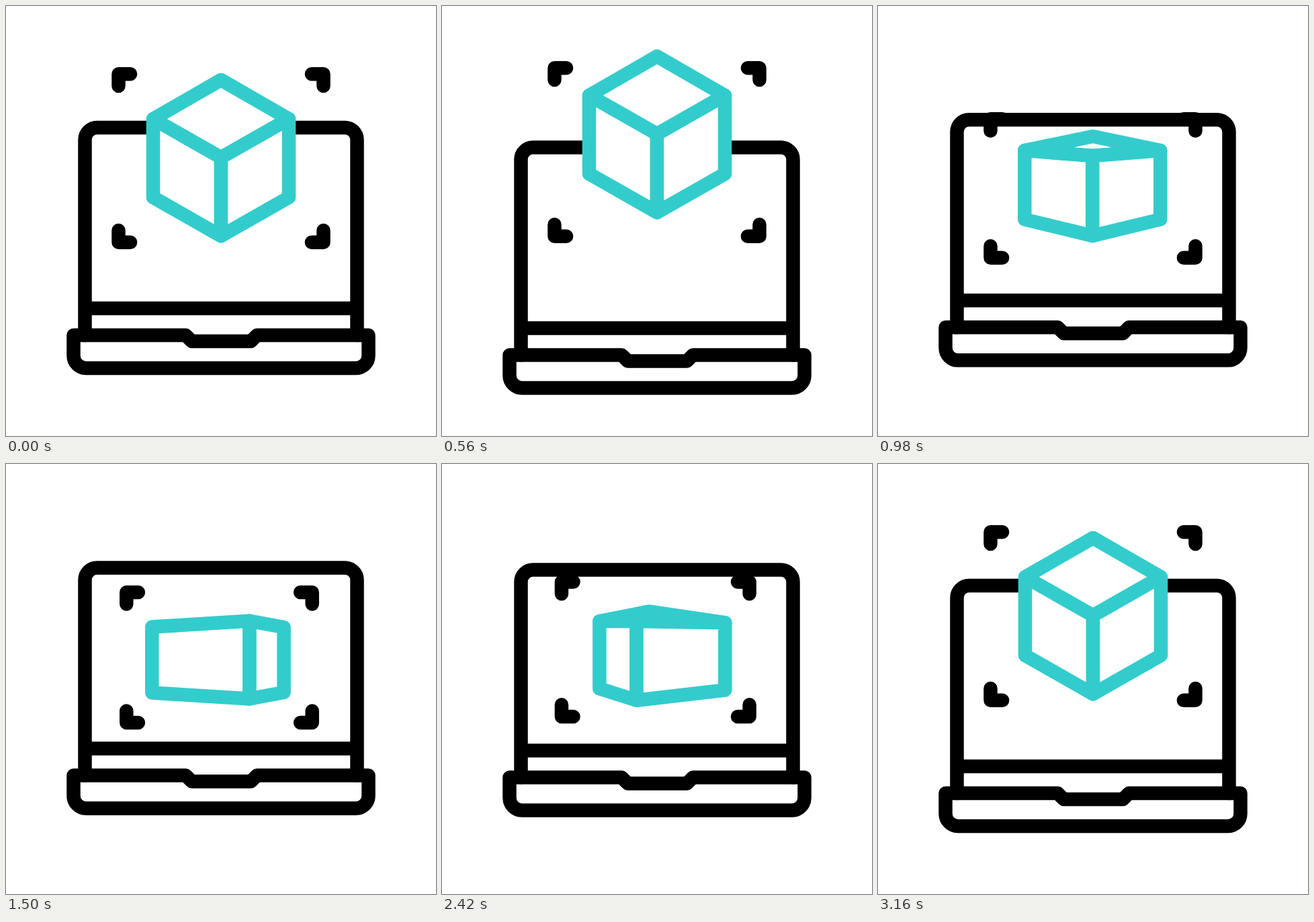
An HTML page that plays this animation: 640x640 px, repeating every 3300 ms.

```html
<!DOCTYPE html>
<html lang="en">
<head>
<meta charset="utf-8">
<title>Laptop with cube</title>
<style>
  html, body { margin: 0; width: 100%; height: 100%; overflow: hidden; background: #fff; }
  svg { display: block; width: 100vw; height: 100vh; }
  path { fill: none; stroke: #000; stroke-width: 20.5; stroke-linecap: round; stroke-linejoin: round; }
  .cube path { fill: #fff; stroke: #33cccc; }
  .rays path { stroke: #33cccc; }
</style>
</head>
<body>
<svg viewBox="0 0 640 640">
  <g id="laptop">
    <path d="M117.5 490V199a18 18 0 0 1 18-18H504.5a18 18 0 0 1 18 18V490M117.5 450H522.5"/>
    <path d="M100.5 490H267.500L276.500 499H364.500L373.500 490H539.500V520.500a18.500 18.500 0 0 1-18.500 18.500H119a18.500 18.500 0 0 1-18.500-18.500Z"/>
  </g>
  <path id="corners"/>
  <g class="rays"><path/><path/><path/></g>
  <g class="cube"><path id="lid"/><path id="left"/><path id="right"/></g>
</svg>
<script>
const LOOP = 3300;
const $ = id => document.getElementById(id);
const rays = [...document.querySelectorAll('.rays path')];

const mix = (a, b, u) => a + (b - a) * u;
const span = (t, from, to) => Math.min(1, Math.max(0, (t - from) / (to - from)));
const ease = (t, from, to) => {
  const u = span(t, from, to);
  return u * u * (3 - 2 * u);
};

const poly = (pts, close) =>
  'M' + pts.map(p => p[0].toFixed(2) + ' ' + p[1].toFixed(2)).join('L') + (close ? 'Z' : '');

// One upright cube edge at an angle from the viewer
function edge(deg, cy, tilt) {
  const a = deg * Math.PI / 180, c = Math.cos(a), s = Math.sin(a);
  const near = Math.max(0, c);
  const depth = (c > 0 ? 0.2 : s < 0 ? 0.75 : 0) * (1 - tilt);
  const half = mix(48.5 + 11.5 * near ** 3, 58.3, tilt);
  const x = 319 + tilt + 101 * s / (1 - depth * c);
  const y = cy + 57.5 * tilt * near;
  return { x, top: [x, y - half], bottom: [x, y + half] };
}

function face(el, a, b) {
  el.setAttribute('d', b.x - a.x > 0.5 ? poly([a.top, b.top, b.bottom, a.bottom], true) : '');
}

function drawCube(cy, tilt, yaw) {
  const turn = yaw > 45 ? yaw - 90 : yaw;
  const [l, f, r] = [-90, 0, 90].map(d => edge(turn + d, cy, tilt));
  const back = [mix(320, f.x, 0.4), cy - mix(55, 116.5, tilt)];
  $('lid').setAttribute('d', tilt > 0.005 ? poly([l.top, back, r.top, f.top], true) : '');
  face($('left'), l, f);
  face($('right'), f, r);
}

function drawCorners(x, y, w, h) {
  const arm = 17.6;
  let d = '';
  for (const sx of [-1, 1]) for (const sy of [-1, 1]) {
    const cx = x + sx * w, cy = y + sy * h;
    d += poly([[cx, cy - sy * arm], [cx, cy], [cx - sx * arm, cy]]);
  }
  $('corners').setAttribute('d', d);
}

// Three rays fan out from a point below, then retract outwards
function drawRays(head, tail) {
  const shown = head > 0.02 && tail < 1;
  rays.forEach((el, i) => {
    const a = (i - 1) * 0.72, sin = Math.sin(a), cos = Math.cos(a);
    const pt = u => {
      const r = 70 + 48 * u;
      return [326 + r * sin, 151 - r * cos];
    };
    el.setAttribute('d', shown ? poly([pt(tail), pt(head)]) : '');
  });
}

function draw(t) {
  const lift = ease(t, 345, 667), drop = ease(t, 667, 1120), rise = ease(t, 2322, 2795);
  const flat = drop * (1 - rise);
  const shrink = ease(t, 1270, 1500) * (1 - rise);
  const sink = 6 * ease(t, 1500, 2210) * (1 - rise);
  const u = span(t, 1266, 2210);
  const yaw = 74 * u * (1.15 - 0.15 * u) + 16 * rise;
  // Wind up, dock in the screen, return
  const pose = (rest, high, docked) => mix(mix(mix(rest, high, lift), docked, drop), rest, rise);

  $('laptop').setAttribute('transform', `translate(0 ${pose(0, 39.5, -26.5).toFixed(2)})`);
  drawCorners(320 - 2.5 * shrink, pose(226.5, 214.5, 288) - sink, 152.5 - 14.3 * shrink, 125.2 - 28.2 * flat);
  drawRays(ease(t, 2656, 3074), ease(t, 2750, 3155));
  drawCube(pose(226.5, 179.5, 291.5), (1 - flat) ** 0.85, yaw);
}

const start = performance.now();
function tick() {
  draw((performance.now() - start) % LOOP);
  requestAnimationFrame(tick);
}
tick();
</script>
</body>
</html>
```
